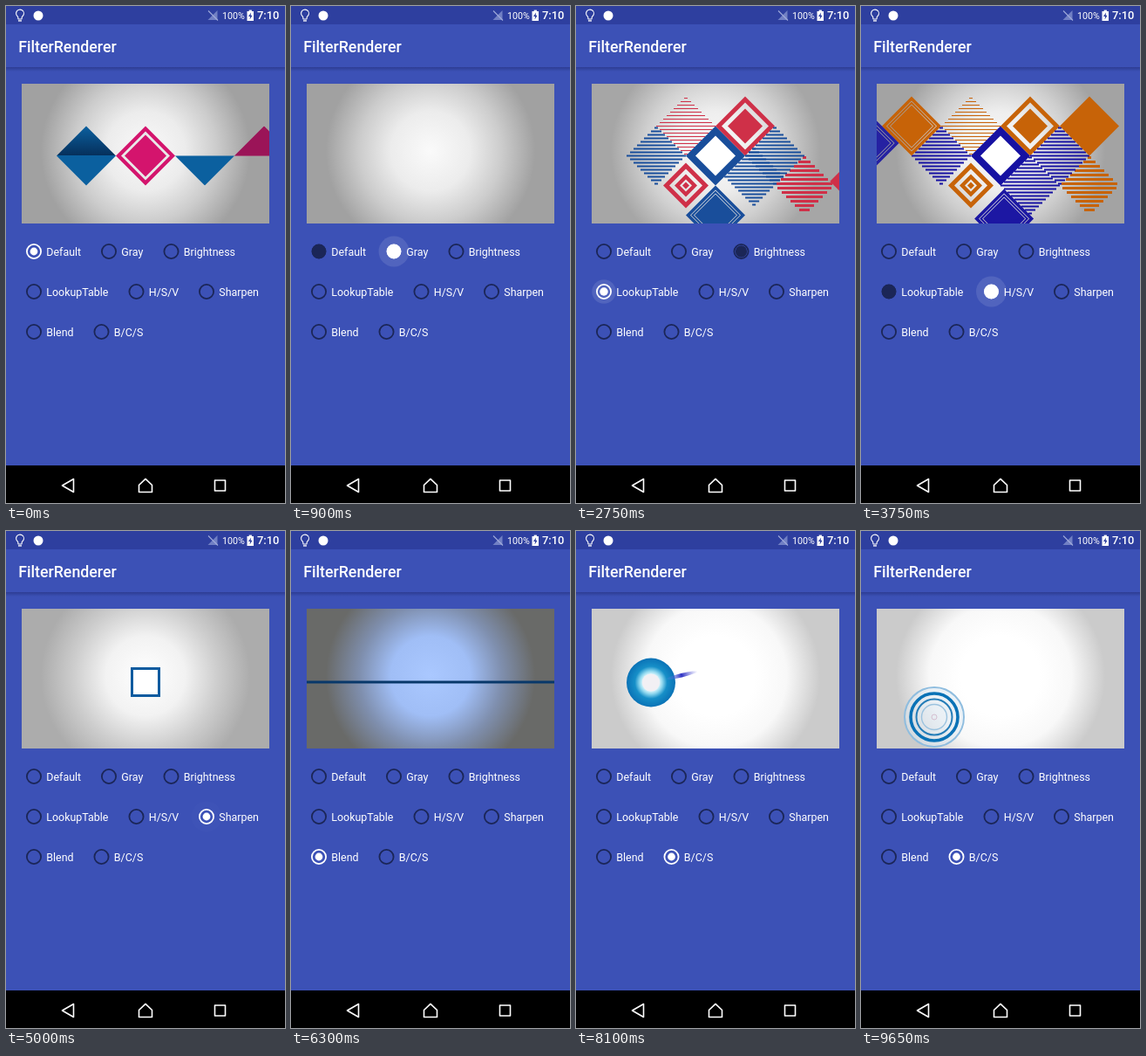
An HTML page with a canvas for the animation above (9.75 s loop, 320 by 569 pixels).

```html
<!DOCTYPE html>
<html lang="en">
<head>
<meta charset="utf-8">
<title>FilterRenderer</title>
<style>
html, body { margin: 0; width: 100%; height: 100%; overflow: hidden; background: #3c51b6; }
canvas { display: block; width: 320px; height: 569px; }
</style>
</head>
<body>
<canvas id="stage" width="320" height="569"></canvas>
<script>
const ctx = document.getElementById('stage').getContext('2d');
const LOOP = 9750, STEP = 50, TAU = Math.PI * 2;
const VIDEO = { x: 18, y: 89, w: 284, h: 160 };

const clamp = v => Math.min(1, Math.max(0, v));
const span = (t, from, to) => clamp((t - from) / (to - from));
const mix = (a, b, p) => a + (b - a) * p;
const smooth = p => p * p * (3 - 2 * p);
const grey = v => `rgb(${v},${v},${v})`;

// Each filter: label position, tap time and the colours it gives the clip.
const filters = [
  { label: 'Default', x: 32, y: 281, at: -1000, bg: [250, 236, 204, 161].map(grey), blue: '#0b609f', pink: '#d4146d', white: '#e9e9e9' },
  { label: 'Gray', x: 118, y: 281, at: 750, bg: [250, 236, 204, 161].map(grey), blue: '#585858', pink: '#686868', white: '#eee' },
  { label: 'Brightness', x: 189.5, y: 281, at: 1700, bg: [140, 124, 91, 47].map(grey), blue: '#080a60', pink: '#a2181e', white: '#a8a8a8' },
  { label: 'LookupTable', x: 32, y: 327, at: 2700, bg: [250, 238, 208, 166].map(grey), blue: '#194e9b', pink: '#cf3048', white: '#fff' },
  { label: 'H/S/V', x: 149.5, y: 327, at: 3650, bg: [252, 238, 206, 163].map(grey), blue: '#1611a2', pink: '#c76308', white: '#fff' },
  { label: 'Sharpen', x: 230, y: 327, at: 4600, bg: [255, 242, 206, 172].map(grey), blue: '#0d5b9f', pink: '#d4146d', white: '#fff' },
  { label: 'Blend', x: 32, y: 373, at: 5700, bg: ['#aac8ff', '#a0bef6', '#7f8fae', '#696a68'], blue: '#08386a', pink: '#8a2060', white: '#aac8ff' },
  { label: 'B/C/S', x: 109.5, y: 373, at: 7400, bg: ['#fff', '#fff', '#f8f8f8', '#cbcbcb'], blue: '#0a72b6', pink: '#e0147a', white: '#fff' }
];

const nested = {
  solid: [34], frame: [34, 23], bold: [34, 12], target: [26, 19, 13, 7, 4],
  double: [34, 28, 24], inset: [34, 27, 20], lined: [34, 29, 28, 25, 24]
};
const striped = { fine: [4, 1.2], even: [4, 2], wide: [5, 3] };

// Tiles on a diagonal grid: column, row, tint, style, arrival, departure.
const tiles = [
  [1, 1, 'pink', 'frame', 900, 2400],
  [2, 0, 'blue', 'even', 820, 3820],
  [3, 1, 'pink', 'target', 1050, 3980],
  [4, 0, 'blue', 'frame', 850, 9000],
  [5, -1, 'pink', 'inset', 1200, 3920],
  [4, 2, 'blue', 'lined', 1300, 3670],
  [7, 1, 'pink', 'wide', 1500, 3780],
  [8, 2, 'blue', 'bold', 1340, 2500],
  [6, 0, 'blue', 'even', 2100, 3900],
  [3, -1, 'pink', 'fine', 2250, 3860],
  [5, 1, 'blue', 'even', 2400, 3960],
  [7, -1, 'pink', 'solid', 2550, 3800],
  [1, -1, 'pink', 'lined', 2700, 3760],
  [0, 0, 'blue', 'lined', 2900, 3600]
];

function circle(x, y, r, fill) {
  ctx.beginPath();
  ctx.arc(x, y, Math.max(0, r), 0, TAU);
  ctx.fillStyle = fill;
  ctx.fill();
}

function ring(x, y, r, width, color) {
  ctx.beginPath();
  ctx.arc(x, y, Math.max(0, r), 0, TAU);
  ctx.lineWidth = width;
  ctx.strokeStyle = color;
  ctx.stroke();
}

function poly(...points) {
  ctx.beginPath();
  points.forEach(([x, y]) => ctx.lineTo(x, y));
  ctx.closePath();
}

function rect(x, y, w, h, fill) {
  ctx.fillStyle = fill;
  ctx.fillRect(x, y, w, h);
}

function text(str, x, y, size, weight = 400) {
  ctx.font = `${weight} ${size}px Roboto, sans-serif`;
  ctx.fillStyle = '#fff';
  ctx.fillText(str, x, y);
}

function addDiamond(x, y, h) {
  ctx.moveTo(x, y - h);
  ctx.lineTo(x + h, y);
  ctx.lineTo(x, y + h);
  ctx.lineTo(x - h, y);
  ctx.closePath();
}

function diamond(x, y, style, fill) {
  ctx.beginPath();
  ctx.fillStyle = fill;
  if (nested[style]) {
    nested[style].forEach(h => addDiamond(x, y, h));
    ctx.fill('evenodd');
    return;
  }
  const [pitch, weight] = striped[style];
  for (let dy = -32; dy <= 32; dy += pitch) {
    const half = 34 - Math.abs(dy);
    ctx.rect(x - half, y + dy - weight / 2, half * 2, weight);
  }
  ctx.fill();
}

function shade(y, dark) {
  const g = ctx.createLinearGradient(0, y - 34, 0, y + 34);
  g.addColorStop(0, dark.blue);
  g.addColorStop(.49, '#06305c');
  g.addColorStop(.5, dark.blue);
  g.addColorStop(1, dark.blue);
  return g;
}

// Opening row: the two right-hand diamonds unfold from their halves.
function drawRow(t, look) {
  const y = 171.5, leave = 1 - smooth(span(t, 600, 850));
  if (!leave) return;
  for (let k = 0; k < 4; k++) {
    const x = 92 + 68 * k, open = 34 * smooth(span(t, 60 + k * 60, 300 + k * 60));
    ctx.save();
    ctx.translate(x, y);
    ctx.scale(leave, leave);
    ctx.translate(-x, -y);
    if (k > 1) {
      ctx.beginPath();
      ctx.rect(x - 34, k === 2 ? y - open : y - 34, 68, 34 + open);
      ctx.clip();
    }
    if (k === 1) {
      diamond(x, y, 'solid', look.white);
      diamond(x, y, 'double', look.pink);
    } else {
      diamond(x, y, 'solid', k === 0 ? shade(y, look) : k === 2 ? look.blue : look.pink);
      if (k === 3) diamond(x, y, 'solid', `rgba(50,20,50,${.35 * (1 - open / 34)})`);
    }
    ctx.restore();
  }
}

function drawTiles(t, look) {
  for (const [col, row, tint, style, arrive, depart] of tiles) {
    const away = span(t, depart, depart + 450) ** 2 * 130;
    const near = (1 - span(t, arrive, arrive + 450)) ** 2 * 205;
    if (t < arrive || t >= depart + 450) continue;
    if (col === 4 && row === 0 && t >= 4400) continue;
    const sx = Math.sign(col - 4) || 1, sy = Math.sign(row) || sx;
    const fromY = row ? -Math.sign(row) : 1;
    const x = 24 + 34 * col + sx * (away * 2 + near) - sx * away;
    const y = 171.5 + 34 * row + sy * away + fromY * near;
    ctx.globalAlpha = 1 - away / 130;
    if (col === 4 && row === 0) diamond(x, y, 'solid', look.white);
    diamond(x, y, style, look[tint]);
    ctx.globalAlpha = 1;
  }
}

function drawSquare(t, look) {
  if (t < 4400 || t >= 7000) return;
  const turn = smooth(span(t, 4400, 4900)), flat = smooth(span(t, 5250, 5950));
  const shrink = smooth(span(t, 6500, 7000));
  const weight = mix(8, 3, turn);
  const left = mix(160 - mix(24, 17, turn), 16, flat);
  const right = mix(160 + mix(24, 17, turn), 304, flat);
  const height = mix(mix(48, 34, turn), 3, flat);
  const x0 = mix(left, 84, shrink), x1 = mix(right, 88, shrink);
  ctx.save();
  ctx.translate(160, 173);
  ctx.rotate((1 - turn) * Math.PI / 4);
  ctx.translate(-160, -173);
  rect(x0, 173 - height / 2, x1 - x0, height, look.blue);
  if (height > weight * 2) {
    rect(x0 + weight, 173 - height / 2 + weight, x1 - x0 - weight * 2, height - weight * 2, look.white);
  }
  ctx.restore();
}

function drawDisc(t, look) {
  if (t < 6900 || t >= 8900) return;
  const size = smooth(span(t, 6900, 7600)) * (1 - smooth(span(t, 8500, 8900)));
  const y = mix(173.5, 213, smooth(span(t, 8350, 8850))), r = 28 * size;
  if (r < 1) return;
  const g = ctx.createRadialGradient(86, y, r * .32, 86, y, r);
  g.addColorStop(0, '#e6fbff');
  g.addColorStop(.22, '#8cd6ee');
  g.addColorStop(.5, '#168fc8');
  g.addColorStop(1, look.blue);
  circle(86, y, r, g);
  circle(86, y, r * .36, '#f2f0f4');
}

function drawComet(t) {
  const p = span(t, 7900, 8400);
  if (p <= 0 || p >= 1) return;
  const x = mix(91, 151, p), y = 171 - (x - 91) * .24;
  ctx.save();
  ctx.translate(x + 6, y);
  ctx.rotate(-.24);
  const g = ctx.createLinearGradient(-19, 0, 19, 0);
  g.addColorStop(0, 'rgba(110,150,235,0)');
  g.addColorStop(.5, '#3034c4');
  g.addColorStop(1, 'rgba(110,110,225,0)');
  ctx.beginPath();
  ctx.ellipse(0, 0, 19, 2.2, 0, 0, TAU);
  ctx.fillStyle = g;
  ctx.fill();
  ctx.restore();
}

function drawRings(t, look) {
  const grow = smooth(span(t, 8650, 9400));
  if (!grow) return;
  ctx.globalAlpha = grow;
  circle(84, 213, 33 * grow, 'rgba(225,236,244,.55)');
  ring(84, 213, 34 * grow, 2, '#8fbddf');
  ring(84, 213, 27 * grow, 3.6, look.blue);
  ring(84, 213, 20.5 * grow, 2, '#257db8');
  ring(84, 213, 14.5 * grow, 1.4, '#9cc3df');
  ring(84, 213, 3 * grow, 1, '#d5bfd0');
  ctx.globalAlpha = 1;
}

function drawVideo(t, look) {
  const { x, y, w, h } = VIDEO;
  ctx.save();
  ctx.beginPath();
  ctx.rect(x, y, w, h);
  ctx.clip();
  const g = ctx.createRadialGradient(160, 166, 0, 160, 166, 120);
  [0, .38, .68, 1].forEach((stop, i) => g.addColorStop(stop, look.bg[i]));
  rect(x, y, w, h, g);
  drawRow(t, look);
  drawTiles(t, look);
  drawSquare(t, look);
  drawDisc(t, look);
  drawComet(t);
  drawRings(t, look);
  ctx.restore();
}

function drawRadio(t, index, active) {
  const { x, y, label, at } = filters[index];
  const checked = index === active;
  const changed = checked ? at : index === active - 1 ? filters[active].at : -1000;
  const p = span(t, changed, changed + 350);
  const fade = 1 - span(t, changed + 200, changed + 420);
  if (checked && fade > 0) circle(x, y, mix(10, 17.5, span(t, at, at + 100)), `rgba(255,255,255,${.11 * fade})`);
  const color = checked ? '#fff' : '#1b2657';
  const start = checked ? 0 : 4.4, end = checked ? 4.4 : 0;
  const dot = p < .25 ? mix(start, 8.3, p * 4) : p < .5 ? 8.3 : mix(8.3, end, p * 2 - 1);
  ring(x, y, p > .2 && p < .5 ? 7.5 : 8.1, 1.8, color);
  if (dot > 0) circle(x, y, dot, color);
  text(label, x + 14.3, y + 4.7, 12.44);
}

function drawStatusBar() {
  rect(0, 0, 320, 21, '#2e3f9f');
  ctx.lineWidth = 1.1;
  ctx.strokeStyle = '#fff';
  ctx.beginPath();
  ctx.arc(16, 8.5, 4.4, .68 * Math.PI, .32 * Math.PI);
  ctx.lineTo(18, 15);
  ctx.lineTo(14, 15);
  ctx.closePath();
  ctx.stroke();
  rect(14, 16.3, 4, 1.3, '#fff');
  circle(37, 11, 5.5, '#fff');

  poly([242.5, 5], [242.5, 16], [231.5, 16]);
  ctx.fillStyle = '#7180c4';
  ctx.fill();
  ctx.beginPath();
  ctx.moveTo(232, 5.5);
  ctx.lineTo(243, 16.5);
  ctx.strokeStyle = '#a1abda';
  ctx.stroke();

  text('100%', 248, 15, 10.67);
  rect(276.5, 6, 7.5, 11, '#fff');
  rect(278.7, 4.6, 3.2, 1.5, '#fff');
  poly([281, 7.5], [278, 12], [280, 12], [279.6, 15.5], [282.6, 10.7], [280.7, 10.7]);
  ctx.fillStyle = '#2e3f9f';
  ctx.fill();
  text('7:10', 288, 15.3, 12.9, 500);
}

function drawNavBar() {
  rect(0, 526, 320, 43, '#000');
  ctx.strokeStyle = '#fff';
  ctx.lineWidth = 1.6;
  ctx.lineJoin = 'round';
  poly([64.5, 549], [77.5, 541.5], [77.5, 556.5]);
  ctx.stroke();
  poly([152.5, 548.5], [160, 541.3], [167.5, 548.5], [167.5, 556.5], [152.5, 556.5]);
  ctx.stroke();
  ctx.strokeRect(239.5, 543, 12, 12);
}

function draw(t) {
  let active = 0;
  filters.forEach((f, i) => { if (t >= f.at) active = i; });
  rect(0, 0, 320, 569, '#3c51b6');
  const shadow = ctx.createLinearGradient(0, 70, 0, 75);
  shadow.addColorStop(0, 'rgba(20,28,90,.38)');
  shadow.addColorStop(1, 'rgba(20,28,90,0)');
  rect(0, 70, 320, 5, shadow);
  drawStatusBar();
  text('FilterRenderer', 14.2, 53, 17.78, 500);
  drawVideo(t, filters[active]);
  filters.forEach((_, i) => drawRadio(t, i, active));
  drawNavBar();
}

const begin = performance.now();
function tick() {
  const t = (performance.now() - begin) % LOOP;
  draw(Math.floor(t / STEP) * STEP);
  requestAnimationFrame(tick);
}
tick();
</script>
</body>
</html>
```
